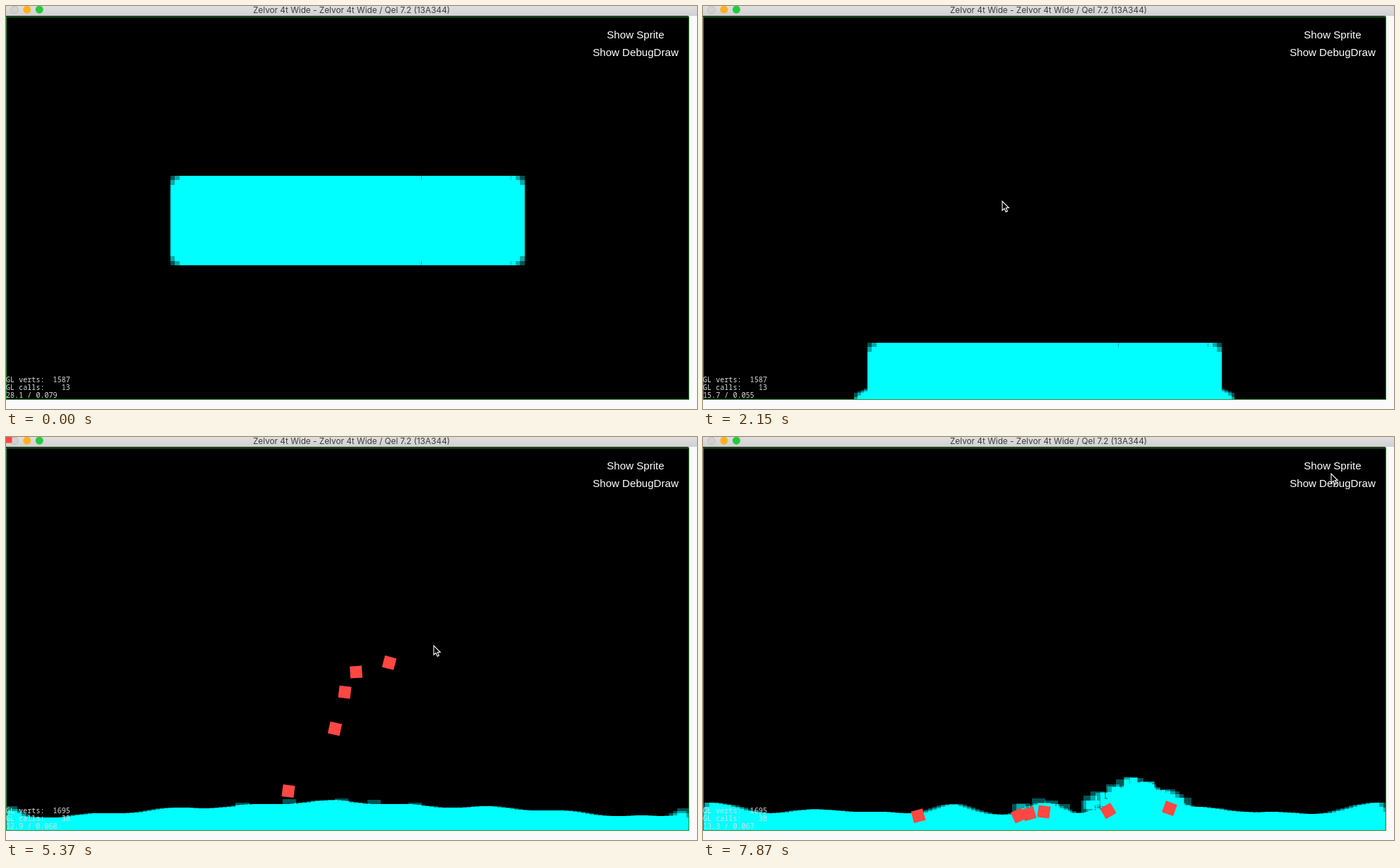
These frames come from a looping animation (979 by 572 pixels, 8000 ms). An HTML page with a canvas:

```html
<!DOCTYPE html>
<html lang="en">
<head>
<meta charset="utf-8">
<title>Liquid simulation</title>
<style>
html, body { margin: 0; width: 100%; height: 100%; overflow: hidden; background: #fafafa; }
canvas, svg { position: absolute; left: 0; top: 0; width: 979px; height: 572px; display: block; }
.title { font: 11.8px Inter, sans-serif; fill: #3c3c3c; text-anchor: middle; }
.menu { font: 15.1px "Liberation Sans", Arial, sans-serif; fill: #fff; text-anchor: middle; }
.stats { font: 10.1px "Noto Sans Mono", monospace; fill: #dcdcdc; }
</style>
</head>
<body>
<canvas id="water" width="979" height="572"></canvas>
<svg viewBox="0 0 979 572">
  <defs>
    <linearGradient id="bar" x2="0" y2="1">
      <stop offset="0" stop-color="#dfdfdf"/><stop offset="1" stop-color="#d0d0d0"/>
    </linearGradient>
  </defs>
  <rect width="979" height="14" fill="url(#bar)"/>
  <circle cx="12" cy="5.2" r="5.2" fill="#d1d1d1" stroke="#b5b5b5" stroke-width=".8"/>
  <circle cx="29.8" cy="5.2" r="5.5" fill="#fdb022"/>
  <circle cx="47.3" cy="5.2" r="5.5" fill="#27c93f"/>
  <text class="title" x="489.5" y="9.8">Zelvor 4t Wide - Zelvor 4t Wide / Qel 7.2 (13A344)</text>
  <rect x=".5" y="15.5" width="967" height="543" fill="none" stroke="#2b8a2b"/>
  <g id="cubes" fill="#ff4843"></g>
  <text class="menu" x="892" y="46">Show Sprite</text>
  <text class="menu" x="892" y="71">Show DebugDraw</text>
  <g class="stats">
    <text id="verts" x="0" y="534"></text>
    <text id="calls" x="0" y="545"></text>
    <text id="fps" x="0" y="556"></text>
  </g>
  <path id="cursor" d="M0 0V13.2L3 10.4L5.2 15.2L7.4 14.2L5.3 9.5H9.3Z" fill="#000" stroke="#fff" stroke-width="1.1"/>
</svg>
<script>
const $ = id => document.getElementById(id);
const LOOP = 8000, TOP = 14, FLOOR = 559, RIGHT = 967;
const CELL = 6.35, SIZE = 3 * CELL, COLS = 161;
const ctx = $('water').getContext('2d');

const lerp = (a, b, k) => a + (b - a) * k;
const part = (t, a, b) => Math.max(0, Math.min(1, (t - a) / (b - a)));
const bell = (d, width) => Math.exp(-d * d / (2 * width * width));
const plateau = (d, width) => 1 / (1 + (d / width) ** 6);
const noise = n => { const v = Math.sin(n * 127.1) * 43758.5453; return v - Math.floor(v); };

// Piecewise linear value through [time, value, ...] points
function track(keys, t, col = 1) {
  let i = 1;
  while (i < keys.length - 1 && keys[i][0] < t) i++;
  const [a, b] = [keys[i - 1], keys[i]];
  return lerp(a[col], b[col], part(t, a[0], b[0]));
}

const STEPS = [[0, 0], [1340, 12], [2150, 19], [3490, 31], [5370, 46], [6830, 57], [7870, 64], [8000, 65]];
const TIMES = STEPS.map(([t, n]) => [n, t]);
const hold = t => track(TIMES, Math.floor(track(STEPS, t) + 1e-6));

// Time, x, y
const CURSOR = [[1340, 373, 288], [2150, 424, 277], [3490, 400, 279], [4020, 400, 283], [4340, 466, 282],
  [4600, 480, 284], [4830, 496, 290], [4970, 543, 292], [5370, 606, 296], [5800, 633, 298],
  [6950, 633, 298], [7700, 890, 52]];

// Time, frames per second, seconds per frame
const RATE = [[0, 28.1, .079], [1340, 19.9, .043], [2150, 15.7, .055], [3490, 13.9, .063],
  [5370, 12.9, .068], [6830, 13.4, .065], [7870, 13.3, .067]];

// Travelling waves: x, height and width, before and after
const WAVES = [
  [275, 10, 60, 180, 6, 45],
  [425, 10, 35, 350, 13, 25],
  [525, 22, 28, 484, 14, 22],
  [575, 14, 22, 620, 44, 33],
  [660, 9, 70, 720, 7, 50]
];

// Time of the highest point, x, y, reach, slope, number of drops
const SPLASHES = [
  [5370, 460, 520, 125, 8, 5],
  [6830, 370, 511, 10, 6, 2],
  [7870, 475, 521, 40, 10, 5],
  [7870, 612, 486, 72, 36, 24]
];

// Time of the click, x after floating, x at the end, final angle
const CUBES = [
  [4020, 352, 305, -15], [4340, 458, 447, -25], [4600, 474, 462, -15],
  [4830, 487, 483, 8], [4970, 554, 574, -30], [5370, 606, 661, 20]
];
const cubes = CUBES.map(() => {
  const r = document.createElementNS('http://www.w3.org/2000/svg', 'rect');
  for (const [k, v] of [['x', -8.5], ['y', -8.5], ['width', 17], ['height', 17]]) r.setAttribute(k, v);
  return $('cubes').appendChild(r);
});

// Whole pixel edges keep neighbouring squares free of seams
function drop(x, y) {
  const left = Math.round(x), top = Math.round(y);
  ctx.fillRect(left, top, Math.round(x + SIZE) - left, Math.round(y + SIZE) - top);
}

// Water level: a mound spreads to a flat pool, then waves cross it
function surface(x, t) {
  const mound = 552 - 70 * plateau(x - 485, 215) - 3 * Math.cos((x - 388) / 21.5);
  const pool = 542 - 17 * plateau(x - 485, 330) - 8 * bell(x - 460, 70);
  const k = part(t, 6830, 7870);
  const waves = WAVES.reduce((y, [x0, h0, w0, x1, h1, w1]) =>
    y - lerp(h0, h1, k) * bell(x - lerp(x0, x1, k), lerp(w0, w1, k)), 535);
  const width = lerp(14, 45, part(t, 5370, 6830));
  const walls = 16 * part(t, 4530, 5370) * (bell(x, width) + bell(x - RIGHT, width));
  return track([[3490, mound], [5370, pool], [6830, waves]], t) - walls;
}

// Left edge and top of one column of particles
function column(i, t, top) {
  const melt = part(t, 2150, 3490), burst = part(t, 1750, 2150), spread = part(t, 3490, 4530);
  const s = i - 4, out = Math.max(0, -s, s - 152);
  let x = 232.9 + Math.max(0, Math.min(152, s)) * CELL / 2;
  let y = top + (i % 2) * 2 * CELL * (1 - part(t, 2150, 2600));
  if (out) {
    x += Math.sign(s) * out * 4.7 * burst;
    y = FLOOR - (18 - out * 2) * burst;
  }
  if (!melt) return [x, y];

  const free = lerp(lerp(88, -3, spread), lerp(864, 951, spread), i / (COLS - 1));
  const level = surface(free + SIZE / 2, t) + 1.6 * Math.sin(i * 12.9 + t * .002);
  const dip = out ? 0 : 18 * Math.sin(Math.PI * melt);
  return [lerp(x, free, melt), lerp(y, level, melt) + dip];
}

function drawBlockOrPool(t) {
  const s = t / 1000, top = 241 + 104.8 * s + 2.5 * s * s;
  for (let i = 0; i < COLS; i++) {
    const [x, y] = column(i, t, Math.min(top, 478));
    const end = Math.min(FLOOR, top + 17.5 * CELL - (i % 2) * 2 * CELL);
    for (let row = y; row < end; row += CELL) drop(x, row);
  }
}

function drawSplashes(t) {
  SPLASHES.forEach(([time, x, y, reach, slope, count], n) => {
    const dt = (t - time) / 1000;
    if (Math.abs(dt) > .6) return;
    for (let i = 0; i < count; i++) {
      const side = 2 * (i + noise(n * 50 + i)) / count - 1;
      const low = slope * (Math.abs(side) + .3 * noise(n * 70 + i + 9));
      drop(x + side * reach - SIZE / 2, y + low - SIZE / 2 + 200 * dt * dt);
    }
  });
}

function drawWater(t) {
  ctx.save();
  ctx.beginPath();
  ctx.rect(0, TOP, RIGHT, FLOOR - TOP);
  ctx.clip();
  ctx.fillStyle = '#000';
  ctx.fillRect(0, TOP, RIGHT, FLOOR - TOP);
  // Three overlapping particles add up to full cyan
  ctx.globalCompositeOperation = 'lighter';
  ctx.fillStyle = 'rgb(0,85,85)';
  drawBlockOrPool(t);
  drawSplashes(t);
  ctx.restore();
}

function drawCubes(t) {
  CUBES.forEach(([born, floatX, endX, lean], i) => {
    const age = (t - born) / 1000;
    const x = track([[5370, track(CURSOR, born)], [6830, floatX], [7870, endX]], t);
    const fall = track(CURSOR, born, 2) + 10 + 115 * age * age;
    const afloat = (surface(x, t) + 543) / 2;
    const turn = track([[born, 0], [5370, born < 5370 ? -lean / 2 : 0], [6830, lean]], t);
    cubes[i].style.display = age < 0 ? 'none' : '';
    cubes[i].setAttribute('transform', `translate(${x} ${Math.min(fall, afloat)}) rotate(${turn})`);
  });
}

const count = (label, n) => label + String(Math.ceil(n)).padStart(6, '\u00a0');

function draw(t) {
  drawWater(t);
  drawCubes(t);
  const n = CUBES.filter(c => t >= c[0]).length;
  $('verts').textContent = count('GL verts:', 1587 + 18 * n);
  $('calls').textContent = count('GL calls:', 13 + 25 * n / 6);
  $('fps').textContent = track(RATE, t).toFixed(1) + ' / ' + track(RATE, t, 2).toFixed(3);
  $('cursor').style.display = t < 600 ? 'none' : '';
  $('cursor').setAttribute('transform', `translate(${track(CURSOR, t)} ${track(CURSOR, t, 2)})`);
}

const start = performance.now();
function tick() {
  draw(hold((performance.now() - start) % LOOP));
  requestAnimationFrame(tick);
}
tick();
</script>
</body>
</html>
```
